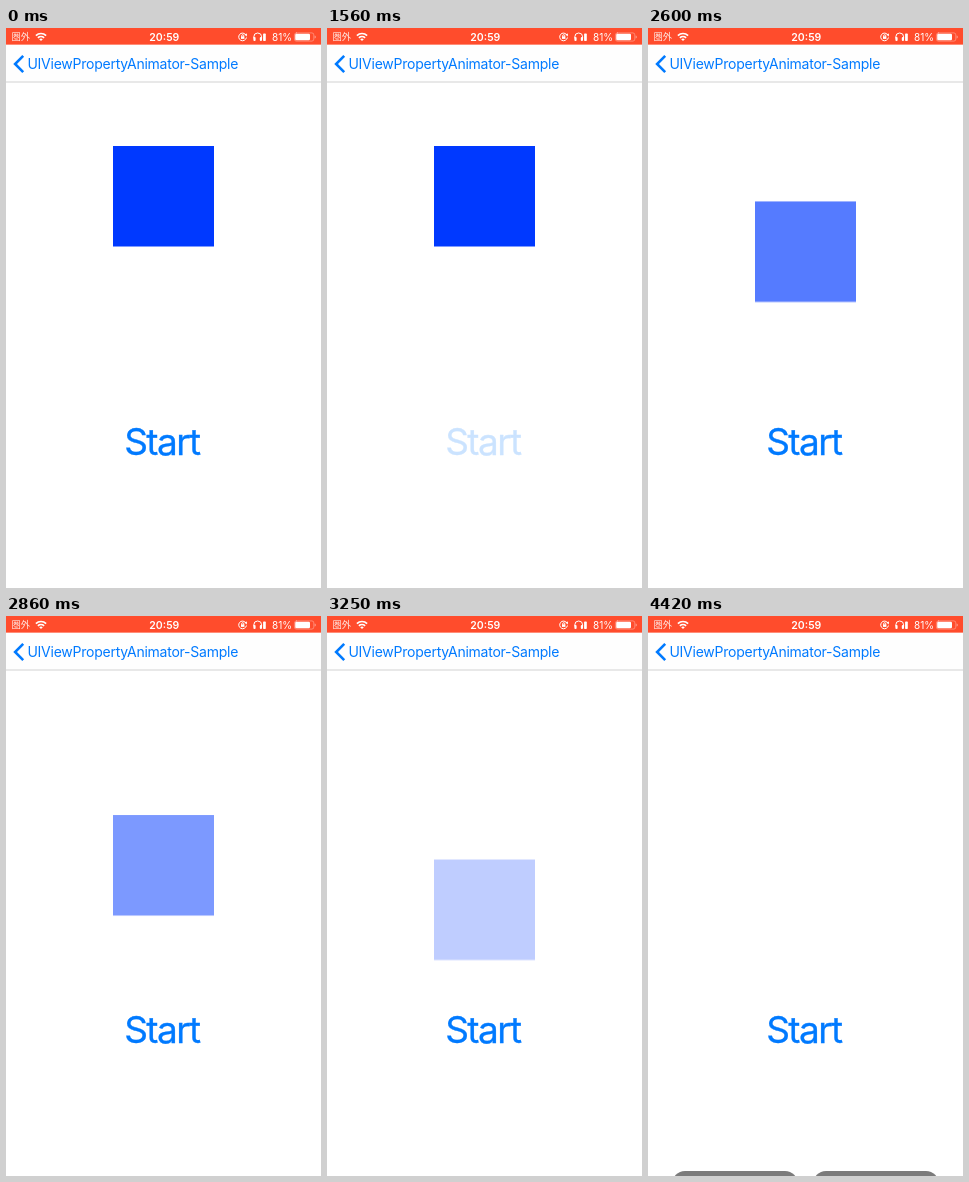
An HTML page for the animation above (4.55 s loop, 315 by 560 pixels).

```html
<!DOCTYPE html>
<html lang="en">
<head>
<meta charset="utf-8">
<title>Property animator demo</title>
<style>
  html, body { margin: 0; width: 100%; height: 100%; overflow: hidden; background: #fff; }
  svg { display: block; width: 315px; height: 560px; }
  text { font-family: Inter, "Noto Sans", sans-serif; font-optical-sizing: none; white-space: pre; }
  .status text { fill: #fff; font-size: 10px; }
  .status .carrier { font: 400 9.3px "Noto Sans CJK JP", "Noto Sans CJK", sans-serif; }
  .status .clock { font-size: 10.5px; font-weight: 600; }
  .line { fill: none; stroke: #fff; stroke-width: 1; stroke-linecap: round; }
  .blue { fill: #007aff; }
  .title { font-size: 14px; letter-spacing: -0.24px; }
  .start { font-size: 37px; letter-spacing: -1.6px; stroke: #007aff; stroke-width: .3; }
</style>
</head>
<body>
<svg viewBox="0 0 315 560">
  <rect width="315" height="560" fill="#fff"/>

  <g class="status">
    <rect width="315" height="16.8" fill="#ff4c2c"/>
    <text class="carrier" x="5.5" y="12.4" opacity=".88">圏外</text>
    <g fill="none" stroke="#fff" stroke-width="1.7">
      <path d="M29.9 7.6a7.3 7.3 0 0 1 10.2 0"/>
      <path d="M31.9 9.8a4.5 4.5 0 0 1 6.2 0"/>
    </g>
    <path d="M33.2 11.2a2.7 2.7 0 0 1 3.6 0L35 13z" fill="#fff"/>
    <text class="clock" x="158.3" y="12.7" text-anchor="middle">20:59</text>

    <path class="line" d="M239.7 6.5a3.9 3.9 0 1 0 .7 3.4"/>
    <path d="M238.2 6.4l2.8-.9-.2 2.9z" fill="#fff"/>
    <rect x="235" y="8.4" width="3.4" height="2.5" fill="#fff"/>
    <path class="line" d="M235.7 8.4v-.7a1 1 0 0 1 2 0v.7" stroke-width=".7"/>

    <path class="line" d="M247.8 10V8.9a3.9 3.9 0 0 1 7.8 0V10"/>
    <rect x="247.4" y="9" width="2.2" height="4" rx="1" fill="#fff"/>
    <rect x="253.8" y="9" width="2.2" height="4" rx="1" fill="#fff"/>
    <rect x="257.1" y="5.5" width="2.7" height="7.5" rx=".7" fill="#fff"/>

    <text x="266" y="12.6">81%</text>
    <rect class="line" x="288.4" y="4.9" width="19.4" height="8.2" rx="2" style="stroke-width: .8" opacity=".4"/>
    <rect x="289.2" y="5.7" width="14.8" height="6.6" rx="1.2" fill="#fff"/>
    <path d="M308.7 7.5a1.6 1.6 0 0 1 0 3z" fill="#fff" opacity=".5"/>
  </g>

  <rect y="16.8" width="315" height="37" fill="#fefefe"/>
  <rect y="53.7" width="315" height=".6" fill="#b2b2b2"/>
  <path d="M17.2 27.8L9.1 36l8.1 8.2" fill="none" stroke="#007aff" stroke-width="2.6"/>
  <text class="blue title" x="21.4" y="40.8">UIViewPropertyAnimator-Sample</text>

  <rect id="box" x="107" y="118" width="101" height="100.5" fill="#0039ff"/>
  <text id="start" class="blue start" x="118.2" y="427.2">Start</text>

  <g id="panels" fill="#7b7b7b">
    <rect x="24" y="555" width="126" height="60" rx="13"/>
    <rect x="165" y="555" width="126" height="60" rx="13"/>
  </g>
</svg>
<script>
const LOOP = 4550, STEP = 130, TAP = 1560, RELEASE = 1573;
const at = (ms, props, easing = 'linear') => ({ offset: ms / LOOP, easing, ...props });

const tracks = {
  box: [
    at(0, { opacity: 1, transform: 'translateY(0px)' }),
    at(RELEASE, { opacity: 1, transform: 'translateY(0px)' }, 'ease-in'),
    at(RELEASE + 2000, { opacity: 0, transform: 'translateY(168px)' }),
    at(LOOP, { opacity: 0, transform: 'translateY(168px)' }),
  ],
  start: [
    at(0, { opacity: 1 }),
    at(TAP, { opacity: 1 }),
    at(TAP, { opacity: 0.2 }),
    at(RELEASE, { opacity: 0.2 }, 'ease-in-out'),
    at(RELEASE + 470, { opacity: 1 }),
    at(LOOP, { opacity: 1 }),
  ],
  panels: [
    at(0, { opacity: 0 }),
    at(4420, { opacity: 0 }),
    at(4420, { opacity: 1 }),
    at(LOOP, { opacity: 1 }),
  ],
};

const players = Object.entries(tracks).map(([id, frames]) => {
  const player = document.getElementById(id).animate(frames, { duration: LOOP, fill: 'both' });
  player.pause();
  return player;
});

// The screen refreshes once per STEP.
const origin = performance.now();
function draw() {
  const time = (performance.now() - origin) % LOOP;
  const shown = Math.floor(time / STEP) * STEP;
  // The small nudge lands just past hard changes.
  for (const player of players) player.currentTime = shown + 0.01;
  requestAnimationFrame(draw);
}
draw();
</script>
</body>
</html>
```
